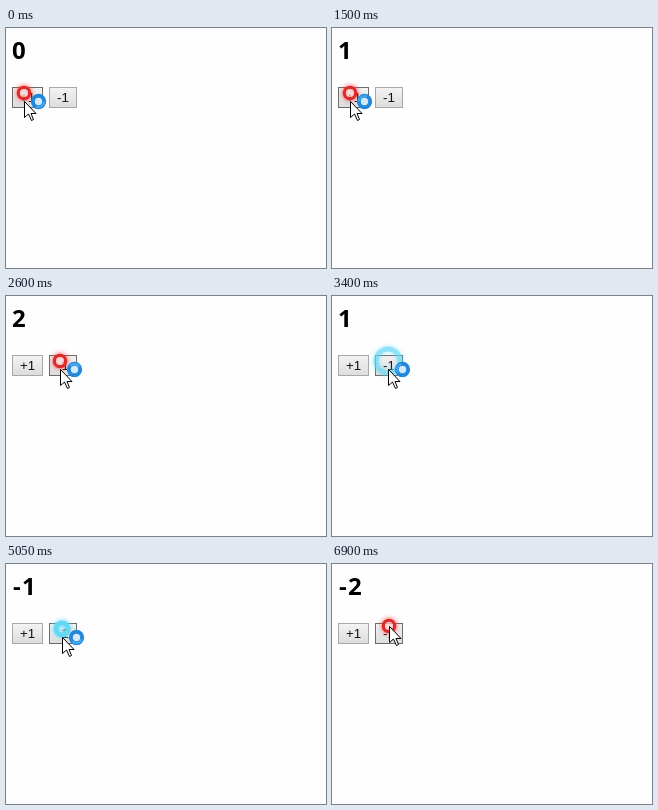
Animation, 320 px wide and 240 px high, one loop 6950 ms. Source, as an HTML page with a canvas:

```html
<!DOCTYPE html>
<html>
<head>
<meta charset="utf-8">
<style>
html, body { margin: 0; width: 100%; height: 100%; overflow: hidden; background: #fefefe; }
canvas { display: block; }
</style>
</head>
<body>
<canvas id="stage" width="320" height="240"></canvas>
<script>
const c = document.getElementById('stage').getContext('2d');
const LOOP = 6950, STEP = 50, RIPPLE = 300;
const BUSY_END = 5500;

// [time, counter value after the click]
const clicks = [[400, 1], [1600, 2], [3200, 1], [4050, 0], [5050, -1], [6500, -2]];
// [time, x, y] of the pointer
const path = [[0, 18, 65], [2150, 18, 65], [2500, 54, 65], [2850, 54, 65], [3400, 56, 65],
  [5450, 56, 65], [5500, 56, 73], [6350, 56, 73], [6750, 57, 62], [LOOP, 57, 62]];

function pointerAt(t) {
  const i = path.findIndex(p => p[0] > t);
  const [t0, x0, y0] = path[i - 1], [t1, x1, y1] = path[i];
  const k = (t - t0) / (t1 - t0), e = k * k * (3 - 2 * k);
  return [Math.round(x0 + (x1 - x0) * e), Math.round(y0 + (y1 - y0) * e)];
}

function ring(x, y, r, width, color, from = 0, to = 2 * Math.PI) {
  c.beginPath();
  c.arc(x, y, r, from, to);
  c.lineWidth = width;
  c.strokeStyle = color;
  c.stroke();
}

function button(x, w, label, hot) {
  const g = c.createLinearGradient(0, 59, 0, 80);
  g.addColorStop(0, '#f4f4f4');
  g.addColorStop(1, '#dcdcdc');
  c.fillStyle = g;
  c.fillRect(x, 59, w, 21);
  c.lineWidth = 1;
  c.strokeStyle = hot ? '#6c6c6c' : '#a8a8a8';
  c.strokeRect(x + .5, 59.5, w - 1, 20);
  c.fillStyle = '#111';
  c.font = '13.33px "Liberation Sans", Arial, sans-serif';
  c.textAlign = 'center';
  c.fillText(label, x + w / 2, 74);
}

function counter(n) {
  c.fillStyle = '#000';
  c.font = 'bold 24px "Open Sans", "Noto Sans", sans-serif';
  c.textAlign = 'left';
  if (n < 0) c.fillText('-', 7, 31);
  c.fillText(Math.abs(n), n < 0 ? 16 : 6, 31);
}

function marker(x, y, age) {
  c.save();
  c.shadowBlur = 5;
  if (age < RIPPLE) {
    const k = age / RIPPLE;
    c.globalAlpha = 1 - k * k;
    c.shadowColor = '#5fdcf8';
    ring(x, y, 6 + 9 * k, 5, '#62d8f5');
  } else {
    c.shadowColor = '#f33';
    ring(x, y, 5.7, 3.2, '#de2b2b');
    c.shadowBlur = 0;
    c.fillStyle = 'rgba(255,255,255,.5)';
    c.beginPath();
    c.arc(x, y, 4, 0, 2 * Math.PI);
    c.fill();
  }
  c.restore();
}

function arrow(x, y) {
  c.save();
  c.translate(x + .5, y + .5);
  c.beginPath();
  [[0, 0], [0, 16], [4, 12.5], [7, 19], [9, 18], [6.5, 12], [11.5, 12]].forEach(p => c.lineTo(...p));
  c.closePath();
  c.fillStyle = '#fff';
  c.fill();
  c.lineWidth = 1;
  c.strokeStyle = '#000';
  c.stroke();
  c.restore();
}

function spinner(x, y, t) {
  const a = t / 1000 * 2 * Math.PI;
  c.fillStyle = '#d3e9f7';
  c.beginPath();
  c.arc(x, y, 5, 0, 2 * Math.PI);
  c.fill();
  ring(x, y, 5.7, 4, '#2388dc');
  ring(x, y, 5.5, 2, '#4aa9ee', a, a + 2);
}

function draw(t) {
  const last = clicks.filter(k => k[0] <= t).pop() || [-RIPPLE, 0];
  const [x, y] = pointerAt(t), busy = t < BUSY_END;
  c.fillStyle = '#fefefe';
  c.fillRect(0, 0, 320, 240);
  counter(last[1]);
  button(6, 31, '+1', x < 37);
  button(43, 28, '-1', x >= 43);
  marker(x, y, t - last[0]);
  const tipY = busy ? y + 8 : y;
  if (busy) spinner(x + 14.5, tipY + .5, t);
  arrow(x, tipY);
}

const start = performance.now();
function tick() {
  const t = (performance.now() - start) % LOOP;
  draw(Math.floor(t / STEP) * STEP);
  requestAnimationFrame(tick);
}
tick();
</script>
</body>
</html>
```
